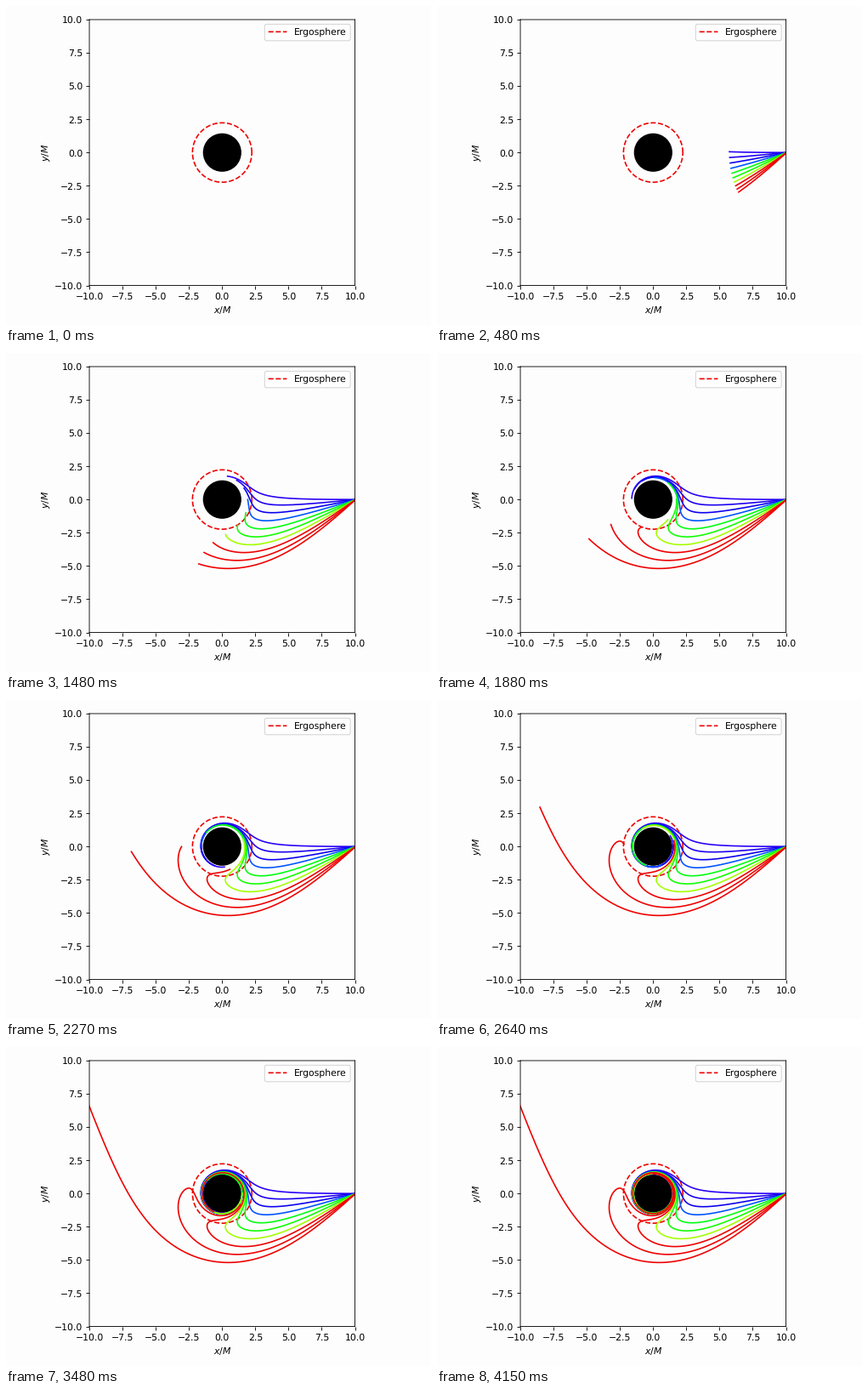
A matplotlib script that plays this animation: 500 by 375 pixels, repeating every 4.18 s.

```python
import numpy as np
import matplotlib.pyplot as plt
from matplotlib.animation import FuncAnimation

W, H, DPI = 500, 375, 78.125
LOOP_MS, FRAMES = 4180, 138
T_END, SUB = 50.0, 12          # coordinate time span, integration steps per frame

SPIN = 0.999
R_START = 10.0
R_HORIZON = 1 + np.sqrt(1 - SPIN**2)
R_ERGO = 2.0
BG = "#fdfdfd"
RED = "#ee0000"
COLORS = ["#2800f8", "#1c00f0", "#0a00f0", "#0054ff", "#00ff10",
          "#10ff00", "#a4ff00", RED, RED, RED]


def radius(r):
    """Plotted distance from the centre for a Boyer-Lindquist radius."""
    return np.sqrt(r**2 + SPIN**2)


def impact(slope):
    """L/E of an ingoing equatorial photon with r dphi/dr = slope."""
    r, a = R_START, SPIN
    vr, vphi = -1.0, -slope / r
    g_tt = -(1 - 2 / r)
    g_tp = -2 * a / r
    g_pp = r**2 + a**2 + 2 * a**2 / r
    g_rr = r**2 / (r**2 - 2 * r + a**2)
    mix = g_tp * vphi
    vt = (-mix - np.sqrt(mix**2 - g_tt * (g_pp * vphi**2 + g_rr * vr**2))) / g_tt
    return (g_tp * vt + g_pp * vphi) / -(g_tt * vt + mix)


def rates(state, b):
    """Derivatives of r, Mino velocity and phi by coordinate time."""
    r, w, _ = state
    a = SPIN
    n = r**3 + a**2 * r + 2 * a * (a - b)
    k = (r**2 - 2 * r + a**2) / (r * n)
    force = 2 * r**3 + (a**2 - b**2) * r + (a - b)**2
    return np.array([w * k, force * k, (b * r + 2 * (a - b)) / n])


def trace(b):
    """Integrate all rays with RK4; returns x and y as (step, ray)."""
    r = np.full_like(b, R_START)
    w = -np.sqrt(r**4 + (SPIN**2 - b**2) * r**2 + 2 * (SPIN - b)**2 * r)
    s = np.array([r, w, np.zeros_like(b)])
    steps = (FRAMES - 1) * SUB
    h = T_END / steps
    path = [s]
    for _ in range(steps):
        k1 = rates(s, b)
        k2 = rates(s + h / 2 * k1, b)
        k3 = rates(s + h / 2 * k2, b)
        k4 = rates(s + h * k3, b)
        s = s + h / 6 * (k1 + 2 * k2 + 2 * k3 + k4)
        path.append(s)
    path = np.array(path)
    rad, phi = radius(path[:, 0]), path[:, 2]
    return rad * np.cos(phi), rad * np.sin(phi)


xs, ys = trace(impact(np.arange(10) / 10))

plt.rcParams.update({"path.snap": False, "text.hinting": "none"})
fig = plt.figure(figsize=(W / DPI, H / DPI), dpi=DPI, facecolor=BG)
ax = fig.add_axes([98.05 / W, 46.5 / H, 312.5 / W, 312.5 / H], facecolor=BG)
ax.set(xlim=(-10, 10), ylim=(-10, 10))
ax.set_xlabel("$x/M$", labelpad=3.5)
ax.set_ylabel("$y/M$", labelpad=3)
ax.tick_params(axis="x", pad=4)
ticks = np.linspace(-10, 10, 9)
ax.set_xticks(ticks)
ax.set_yticks(ticks)

ax.add_patch(plt.Circle((0, 0), radius(R_HORIZON), color="black", lw=0))
angle = np.linspace(0, 2 * np.pi, 200)
ax.plot(radius(R_ERGO) * np.cos(angle), radius(R_ERGO) * np.sin(angle),
        "--", color=RED, lw=1.5, label="Ergosphere")
ax.legend(loc="upper right")

rays = [ax.plot([], [], color=c, lw=1.5)[0] for c in COLORS]


def draw(i):
    # Start empty, then show where each ray is when the frame ends.
    end = (i + 1) * SUB + 1 if i else 0
    for j, ray in enumerate(rays):
        ray.set_data(xs[:end, j], ys[:end, j])
    return rays


anim = FuncAnimation(fig, draw, frames=FRAMES, interval=LOOP_MS / FRAMES,
                     repeat=True, repeat_delay=0)
plt.show()
```
